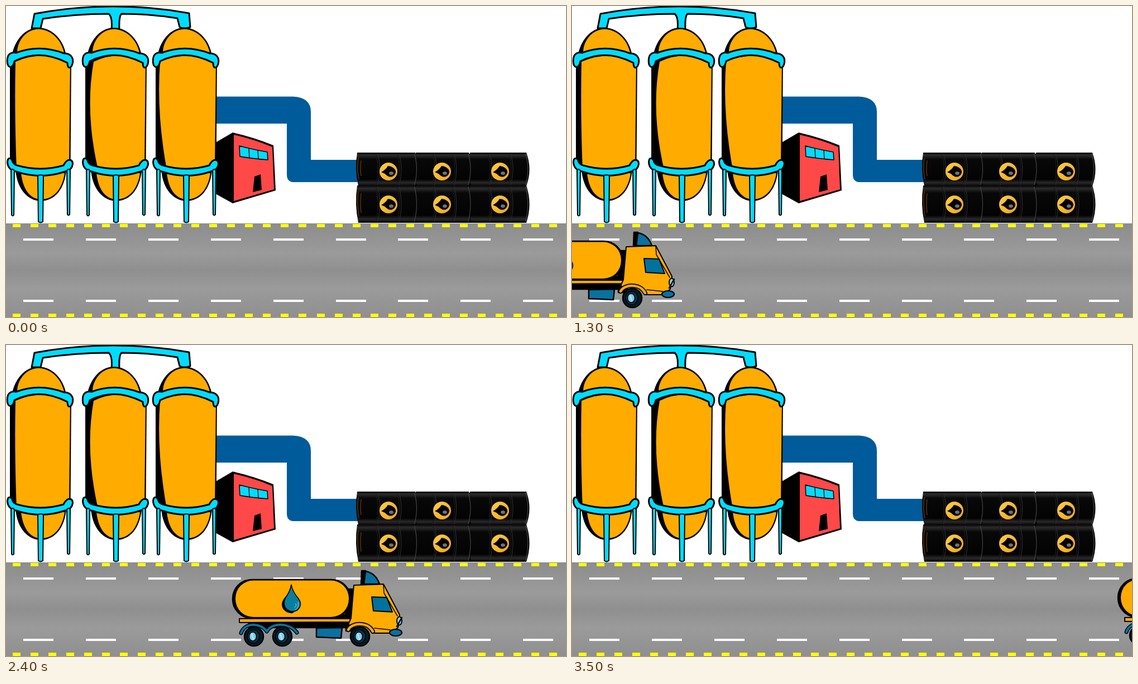
These frames come from a looping animation (1003x558 px, 3.6 s). An HTML page:

```html
<!DOCTYPE html>
<html lang="en">
<head>
<meta charset="utf-8">
<title>Oil depot</title>
<style>
  html, body { margin: 0; width: 100%; height: 100%; overflow: hidden; background: #fff; }
  svg { display: block; width: 100vw; height: 100vh; }
</style>
</head>
<body>
<svg viewBox="0 0 1003 558" preserveAspectRatio="none">
  <defs>
    <linearGradient id="asphalt" x1="0" y1="0" x2="0" y2="1">
      <stop offset="0" stop-color="#8d8d8d"/>
      <stop offset=".15" stop-color="#939393"/>
      <stop offset=".32" stop-color="#9b9b9b"/>
      <stop offset=".5" stop-color="#8f8f8f"/>
      <stop offset=".7" stop-color="#9b9b9b"/>
      <stop offset="1" stop-color="#8f8f8f"/>
    </linearGradient>
    <linearGradient id="steel" x1="0" y1="0" x2="0" y2="1">
      <stop offset="0" stop-color="#050505"/>
      <stop offset=".08" stop-color="#2b2b2b"/>
      <stop offset=".2" stop-color="#080808"/>
      <stop offset=".8" stop-color="#030303"/>
      <stop offset=".9" stop-color="#292929"/>
      <stop offset="1" stop-color="#050505"/>
    </linearGradient>
    <linearGradient id="shine" x1="0" y1="0" x2="1" y2="1">
      <stop offset="0" stop-color="#ffcf45"/>
      <stop offset="1" stop-color="#eda41c"/>
    </linearGradient>
  </defs>

  <g id="plant" stroke-linejoin="round">
    <path fill="#005b9b" d="M376 162.500H514Q546 164 546 190V276H630V316H514Q503 315 503 303V211H376Z"/>
    <path d="M372 247L406 227Q445 236 479 250L483 331L406 354L370 334Z"/>
    <path fill="#ff4848" d="M408 231Q444 239 477 253L480 329L408 350Z"/>
    <path fill="#00dcff" stroke="#000" stroke-width="1.500" d="M418 251Q444 258 468 262L469 276Q442 274 419 270Z"/>
    <path fill="none" stroke="#000" stroke-width="1.300" d="M435 256L436 272M451 259L452 274"/>
    <path d="M442 334L445 306L456 302L458 330Z"/>
    <path fill="#00dcff" stroke="#000" stroke-width="3" d="M46 40L51 14Q190 -12 328 13L330 38Q320 42 311 38L307 22Q260 14 207 14Q202 18 203 42H189Q191 20 184 14Q125 14 66 23L62 40Z"/>
    <g id="tanks"></g>
  </g>
  <g id="barrels"></g>

  <rect y="390" width="1003" height="168" fill="url(#asphalt)"/>
  <g id="marks"></g>

  <g id="truck" stroke="#000" stroke-width="2.5" stroke-linejoin="round" stroke-linecap="round">
    <path d="M257 440H274V515H258Z"/>
    <path stroke="none" d="M80 485H266V498H76Z"/>
    <path d="M84 498H266V509H84Z"/>
    <rect x="55" y="423" width="211" height="69" rx="34"/>
    <rect x="60" y="424.5" width="203" height="65.500" rx="32" fill="#ffab00" stroke="none"/>
    <path stroke="none" d="M159 433Q157 446 147 457C136 472 150 485 163 483L170 474Z"/>
    <path fill="#077f9f" stroke-width="1.500" d="M160 432Q162 444 172 456C183 470 171 480 163 480C148 480 144 466 150 455Q158 444 160 432Z"/>
    <path fill="none" stroke="#9bd2df" stroke-width="1" d="M172 463Q175 472 167 477M168 466Q170 471 166 473"/>
    <path fill="#ffab00" stroke-width="2" d="M67 493H267V499L67 500Z"/>
    <path fill="#0871a0" d="M205 510L251 509L249 528L205 526Z"/>
    <path fill="#ffab00" stroke-width="2" d="M272 433L325 431L354 486L351 509L338 519H306C301 499 273 497 264 515L263 501L267 492Z"/>
    <path fill="none" stroke-width="1.500" d="M325 432L326 447L350 488M309 510L337 513"/>
    <path fill="#0072a0" stroke-width="2" d="M304 454L331 455L341 481L307 479Z"/>
    <path d="M286 407H293L296 431H285Z"/>
    <path fill="#0872a0" d="M290 431L293 408Q311 411 318 431Z"/>
    <ellipse cx="353.500" cy="497" rx="4.500" ry="7.500" fill="#86cfeb" stroke-width="2"/>
    <path fill="none" d="M349 507L358 491"/>
    <ellipse cx="347" cy="518" rx="11" ry="6" fill="#0871a0" stroke-width="2.200"/>
    <g id="wheels"></g>
    <path fill="none" stroke-width="7" d="M70 519C76 499 106 500 116 516C125 499 158 500 170 518"/>
    <path fill="none" stroke="#0871a0" stroke-width="4" d="M70 519C76 499 106 500 116 516C125 499 158 500 170 518"/>
    <path fill="none" stroke-width="8" d="M262 513C268 500 297 498 306 516"/>
    <path fill="none" stroke="#ffab00" stroke-width="4.500" d="M262 513C268 500 297 498 306 516"/>
  </g>
</svg>
<script>
const el = id => document.getElementById(id);
const path = (d, attrs = '') => `<path d="${d}" ${attrs}/>`;
const orange = 'fill="#ffab00"';
const ring = d => path(d, 'fill="#00dcff" stroke="#000" stroke-width="3"');
const leg = (x, top, bottom, w) =>
  path(`M${x - w / 2} ${top}Q${x} ${top - 4} ${x + w / 2} ${top}L${x + w / 2 - 1} ${bottom}Q${x} ${bottom + 3} ${x - w / 2 + 1} ${bottom}Z`,
    'fill="#00dcff" stroke="#000" stroke-width="2"');

// top, mid, low: left edge of the lit side of the vessel
function tank(x, top, mid, low) {
  return `<g transform="translate(${x})">` +
    path('M10 92C14 62 34 39 58 39C84 39 104 62 108 90Z') +
    path('M21 90C16 70 32 42 58 41.5C83 42 102 64 105 90Z', orange) +
    path('M17 294C20 330 40 350 63 350C88 349 105 328 108 294Z') +
    path('M27 300C31 334 46 347 64 347C86 346 101 328 105 300Z', orange) +
    path('M7 95L7 288Q60 308 115.500 290L117 94Q62 78 7 95Z') +
    path(`M${top} 100Q${mid} 190 ${low} 294Q65 306 113 290L115 96Q60 80 ${top} 100Z`, orange) +
    ring('M4 89C8 83 13 83 18 84Q60 68 104 85C116 85 122 93 119 104C116 113 110 113 110 102Q60 76 15 99C13 111 6 112 3 105Q1 96 4 89Z') +
    ring('M2.500 280C3 271 10 271 12 280Q15 285 20 286Q62 298 103 286Q108 276 114 276Q120 277 119.500 284C118 293 112 296 106 297Q62 312 18 297C8 295 3 290 2.500 280Z') +
    leg(12, 295, 375, 6) + leg(112, 295, 374, 6) + leg(62, 305, 387, 10) + '</g>';
}
el('tanks').innerHTML = tank(0, 17, 15, 19) + tank(135, 22, 6, 30) + tank(261, 15, 8, 27);

function barrel(x, end, badge, y, h) {
  const rib = (f, c) => {
    const rx = x + (end - x) * f;
    return path(`M${rx} ${y + 2}Q${rx + 8} ${y + h / 2} ${rx} ${y + h - 2}`, `fill="none" stroke="${c}" stroke-width="1.2"`);
  };
  const cy = y + 34;
  return path(`M${x + 2} ${y}H${end - 4}Q${end + 7} ${y + h / 2} ${end - 4} ${y + h}H${x + 4}Q${x - 3} ${y + h / 2} ${x + 2} ${y}Z`, 'fill="url(#steel)"') +
    rib(.32, '#1c1c1c') + rib(.35, '#2b2b2b') + rib(.67, '#1c1c1c') + rib(.7, '#2b2b2b') + rib(.95, '#444') +
    `<circle cx="${badge}" cy="${cy}" r="16" fill="url(#shine)"/>` +
    path(`M${badge - 1} ${cy - 10}C${badge + 9} ${cy - 9} ${badge + 14} ${cy - 3} ${badge + 13} ${cy + 2}C${badge + 10} ${cy + 11} ${badge + 2} ${cy + 11} ${badge - 3} ${cy + 7}Q${badge - 7} ${cy + 3} ${badge - 13} ${cy + 1}Q${badge - 5} ${cy - 3} ${badge - 1} ${cy - 10}Z`) +
    `<ellipse cx="${badge + 5}" cy="${cy + 3}" rx="4" ry="3" fill="#bbb" opacity=".6"/>`;
}
let stack = '<rect x="634" y="265" width="298" height="124"/>';
for (const [y, h] of [[263, 60], [322, 67]]) {
  for (const [x, end, badge] of [[829, 936, 885], [732, 833, 781], [627, 737, 685]]) stack += barrel(x, end, badge, y, h);
  stack += path(`M631 ${y + 10}Q628 ${y + 30} 632 ${y + h - 12}M636 ${y + 14}Q634 ${y + 30} 636 ${y + h - 18}`, 'fill="none" stroke="#5b310e" stroke-width="1.5"');
}
el('barrels').innerHTML = stack;

let marks = '';
const dash = (x, y, w, h, c) => marks += `<rect x="${x}" y="${y}" width="${w}" height="${h}" fill="${c}"/>`;
for (let i = 0; i < 31; i++) {
  for (const y of [391, 552]) dash(Math.round(11.5 + i * 32.06), y, 14, 6, '#ff0');
}
for (let i = 0; i < 9; i++) {
  for (const y of [417, 527]) dash(Math.round(31 + i * 111.9), y, 54, 4, '#fff');
}
el('marks').innerHTML = marks;

el('wheels').innerHTML = [93, 144, 283].map(x =>
  `<circle cx="${x}" cy="525" r="17" fill="#071c27"/>
   <ellipse cx="${x - 1}" cy="525" rx="11" ry="12" fill="#0b3447" stroke-width="1.5"/>
   <ellipse cx="${x - 2}" cy="525" rx="6.5" ry="8" fill="#83cdec" stroke-width="1.5"/>
   <path d="M${x - 4} 520L${x - 1} 530" stroke="#d5f0fa" stroke-width="1.5"/>`).join('');

// time, front bumper x, vertical shift
const route = [
  [500, 4, -1], [700, 23, -1], [900, 50, -1], [1000, 70, -1], [1200, 141, -1],
  [1600, 314, 0], [1700, 359, 0], [2100, 561, 0], [2200, 612, 0],
  [2700, 856, -4], [2800, 906, -4], [3100, 1068, -4], [3400, 1239, -4], [3500, 1282, -4]
];
const LOOP = 3600, STEP = 100, truck = el('truck');

function render(ms) {
  const t = Math.floor(ms % LOOP / STEP) * STEP;
  const visible = t >= route[0][0];
  truck.style.display = visible ? '' : 'none';
  if (!visible) return;
  const i = Math.max(1, route.findIndex(p => p[0] >= t));
  const [t0, x0, y0] = route[i - 1], [t1, x1, y1] = route[i];
  const k = (t - t0) / (t1 - t0);
  const x = x0 + (x1 - x0) * k - 359, y = y0 + (y1 - y0) * k;
  truck.setAttribute('transform', `translate(${Math.round(x)} ${Math.round(y)})`);
}

let start;
function tick(now) {
  start ??= now;
  render(now - start);
  requestAnimationFrame(tick);
}
render(0);
requestAnimationFrame(tick);
</script>
</body>
</html>
```
